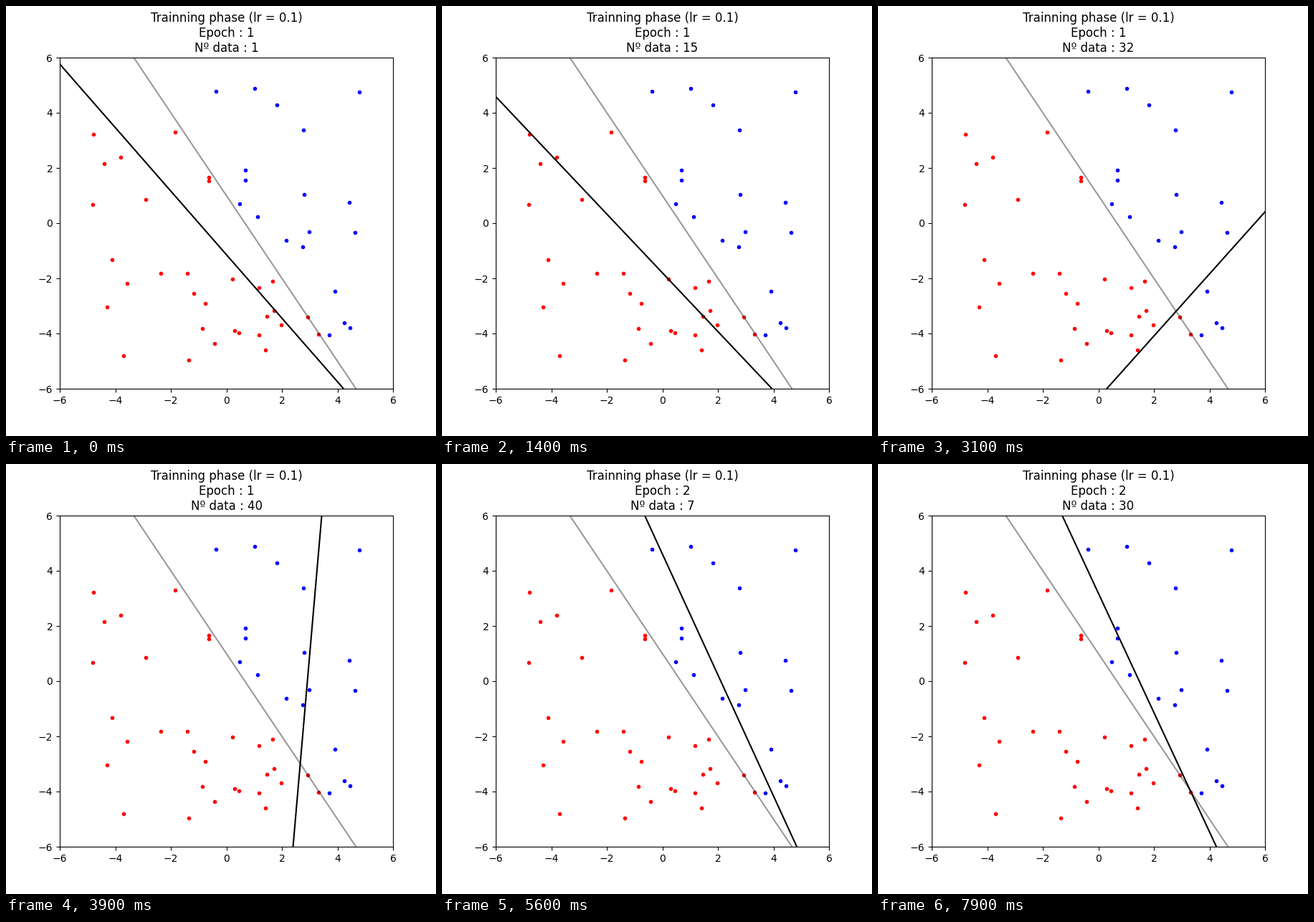
These frames come from a looping animation (600x600 px, 8000 ms). A matplotlib script:

```python
import numpy as np
import matplotlib.pyplot as plt
from matplotlib.animation import FuncAnimation

FRAMES, STEP_MS, SAMPLES, LIM = 80, 100, 50, 6
RATE = 0.1
START = (3.92, 3.953, 3.434)  # bias, x and y weights


def true_line(x):
    return 1 - 1.5 * x


np.random.seed(0)
x = np.random.uniform(-5, 5, SAMPLES)
y = np.random.uniform(-5, 5, SAMPLES)
below = y < true_line(x)


def train(steps):
    """Logistic regression, one sample per step; weights before each step."""
    w = np.array(START)
    history = []
    for step in range(steps):
        history.append(w)
        i = step % SAMPLES
        sample = np.array([1, x[i], y[i]])
        guess = 1 / (1 + np.exp(-w @ sample))
        w = w + RATE * (below[i] - guess) * sample
    return history


weights = train(FRAMES)

fig, ax = plt.subplots(figsize=(6, 6), dpi=100)
ax.set(xlim=(-LIM, LIM), ylim=(-LIM, LIM))
ax.plot(x[below], y[below], "r.")
ax.plot(x[~below], y[~below], "b.")
ends = np.array([-LIM, LIM])
ax.plot(ends, true_line(ends), "k", alpha=0.4)
boundary, = ax.plot([], [], "k")


def draw(step):
    epoch, sample = divmod(step, SAMPLES)
    ax.set_title(f"Trainning phase (lr = {RATE})\nEpoch : {epoch + 1}\n"
                 f"Nº data : {sample + 1}")
    bias, wx, wy = weights[step]
    boundary.set_data(ends, -(bias + wx * ends) / wy)
    return boundary, ax.title


anim = FuncAnimation(fig, draw, frames=FRAMES, interval=STEP_MS, repeat=True)
plt.show()
```
